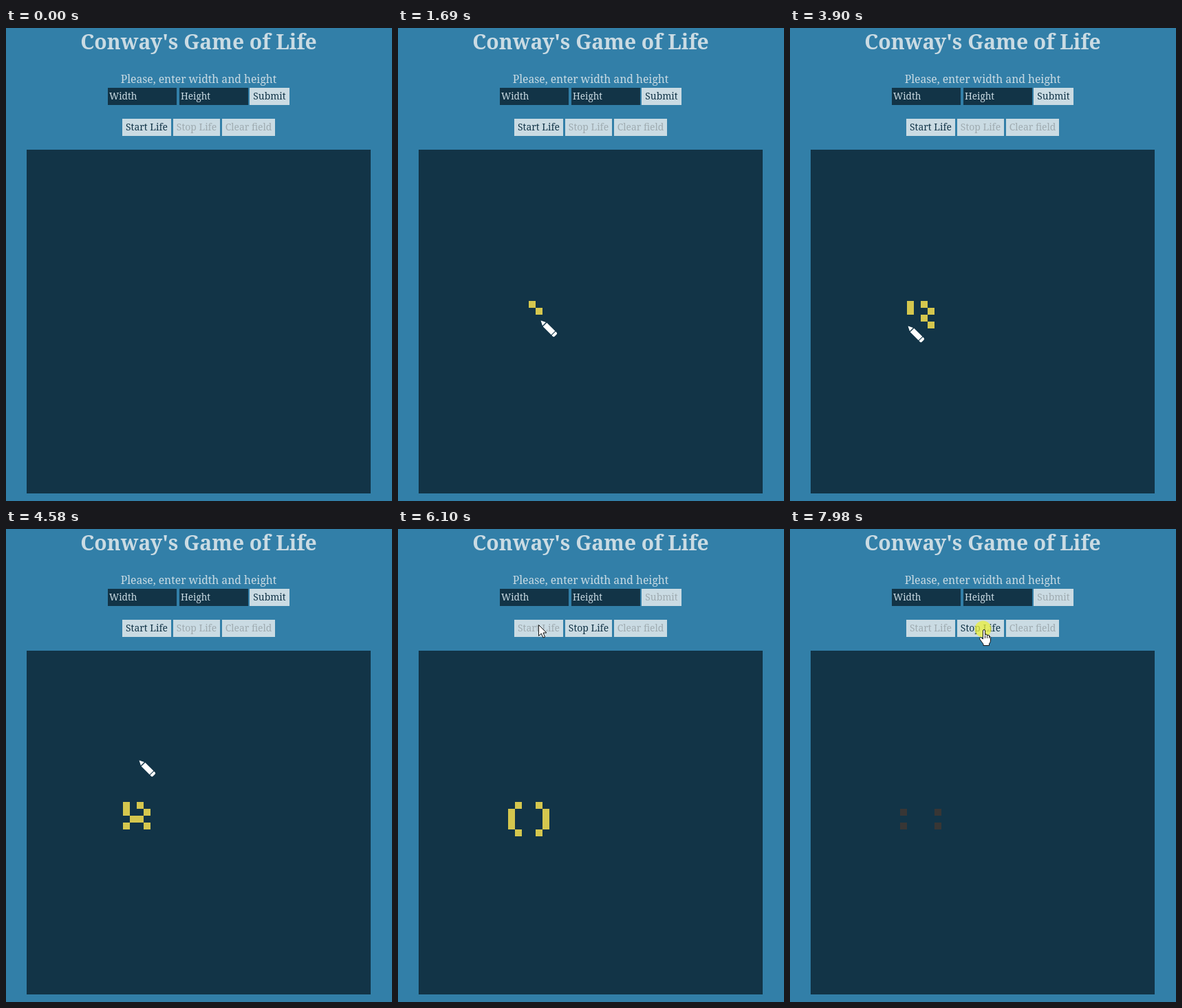
An HTML page with a canvas for the animation above (8000 ms loop, 561 by 688 pixels).

```html
<!DOCTYPE html>
<html lang="en">
<head>
<meta charset="utf-8">
<title>Game of Life</title>
<style>
html, body { margin: 0; width: 100%; height: 100%; overflow: hidden; background: #327fa8; }
canvas { display: block; }
</style>
</head>
<body>
<canvas id="stage" width="561" height="688"></canvas>
<script>
const ctx = document.getElementById('stage').getContext('2d');
const LOOP = 8000, START = 5490, TICK = 100, GLOW = 70;
const SPEED = 0.35; // pointer pixels per millisecond
const PAGE = '#327fa8', DARK = '#123447', LIGHT = '#cadbe3', MUTED = '#9fabb0';
const CELL = '#d5c74e', TRACE = '#383635';
const FIELD = { x: 30, y: 177, size: 500, cell: 10 };

const move = (time, x, y) => ({ time, x, y });
const press = (time, x, y) => ({ time, x, y, pressed: true });

// The pointer reaches each stop by its time; presses in the field toggle the cell below.
const stops = [
  move(460, 212, 509), move(720, 182, 414), press(1140, 200, 404), press(1480, 205, 410),
  move(1690, 208, 426), press(1830, 204, 428), press(2180, 191, 421), press(2400, 184, 424),
  press(2700, 173, 414), move(2940, 160, 407), press(3200, 174, 404), press(3830, 190, 421),
  press(4100, 172, 434), press(4400, 186, 422), move(5000, 212, 141), press(START, 204, 139),
  move(6100, 204, 139), move(7130, 235, 406), move(7450, 299, 260), move(7700, 308, 118),
  press(7950, 282, 146)
];

const key = (col, row) => col + ',' + row;
const inBox = (x, y, left, top, w, h) => x >= left && x < left + w && y >= top && y < top + h;
const inField = (x, y) => inBox(x, y, FIELD.x, FIELD.y, FIELD.size, FIELD.size);

function drawnCells(t) {
  const cells = new Set();
  for (const { time, x, y, pressed } of stops) {
    if (!pressed || time > t || !inField(x, y)) continue;
    const k = key(Math.floor((x - 1 - FIELD.x) / FIELD.cell), Math.floor((y - 1 - FIELD.y) / FIELD.cell));
    if (!cells.delete(k)) cells.add(k);
  }
  return cells;
}

function nextGeneration(cells) {
  const counts = new Map();
  for (const k of cells) {
    const [col, row] = k.split(',').map(Number);
    for (let dx = -1; dx <= 1; dx++) {
      for (let dy = -1; dy <= 1; dy++) {
        if (!dx && !dy) continue;
        const n = key(col + dx, row + dy);
        counts.set(n, (counts.get(n) || 0) + 1);
      }
    }
  }
  const next = new Set();
  for (const [k, n] of counts) if (n === 3 || (n === 2 && cells.has(k))) next.add(k);
  return next;
}

const generations = [drawnCells(START)];
while (generations[generations.length - 1].size) {
  generations.push(nextGeneration(generations[generations.length - 1]));
}
const last = generations.length - 1;
// Cells that stayed alive for three generations near the end leave a dim trace.
const traces = [...generations[last - 3]].filter(k => generations[last - 4].has(k) && generations[last - 5].has(k));

function pointerAt(t) {
  const i = stops.findIndex(s => s.time > t);
  if (i === 0) return null;
  if (i < 0) return stops[stops.length - 1];
  const from = stops[i - 1], to = stops[i];
  const duration = Math.min(to.time - from.time, Math.hypot(to.x - from.x, to.y - from.y) / SPEED);
  const u = duration ? Math.min(1, (t - from.time) / duration) : 1;
  return {
    x: Math.round(from.x + (to.x - from.x) * u),
    y: Math.round(from.y + (to.y - from.y) * u)
  };
}

function box(x, y, w, h, color) {
  ctx.fillStyle = color;
  ctx.fillRect(x, y, w, h);
}

function label(text, x, y, size, color, align = 'center', weight = 400) {
  ctx.font = `${weight} ${size}px "Noto Serif", serif`;
  ctx.textAlign = align;
  ctx.fillStyle = color;
  ctx.fillText(text, x, y);
}

function button(text, x, y, w, enabled) {
  box(x, y, w, 25, LIGHT);
  label(text, x + w / 2, y + 17, 13.9, enabled ? DARK : MUTED);
}

function input(text, x) {
  box(x, 87, 100, 25, DARK);
  label(text, x + 2, 104, 13.6, LIGHT, 'left', 500);
}

function drawCells(cells, color) {
  for (const k of cells) {
    const [col, row] = k.split(',').map(Number);
    box(FIELD.x + col * FIELD.cell, FIELD.y + row * FIELD.cell, FIELD.cell, FIELD.cell, color);
  }
}

function drawPencil() {
  ctx.translate(-.5, -.5);
  ctx.rotate(Math.PI / 4);
  ctx.fillStyle = '#fff';
  ctx.beginPath();
  ctx.moveTo(0, 0);
  ctx.lineTo(7, -3.5);
  ctx.lineTo(7, 3.5);
  ctx.fill();
  ctx.fillRect(8.5, -4, 17, 8);
  ctx.beginPath();
  ctx.roundRect(26.5, -4, 4, 8, [0, 2, 2, 0]);
  ctx.fill();
}

const arrowShape = new Path2D('M.5 .5V16.5L4.2 13L7 19L9.6 18L7 12H11.8Z');
const handShape = new Path2D('M-1.5 14V2Q-1.5 .5 0 .5T1.5 2V8Q1.5 7 3 7T4.5 9Q5 8 6 8.2T7.5 10' +
  'Q9.5 9.5 9.5 12V16Q9.5 19 7.5 21V23.5H-1V21.5L-6 14.5Q-7 12.5 -5.5 11.8T-3 13Z');

function drawOutlined(shape) {
  ctx.fillStyle = '#fff';
  ctx.strokeStyle = '#111';
  ctx.lineWidth = 1;
  ctx.fill(shape);
  ctx.stroke(shape);
}

function drawHand() {
  drawOutlined(handShape);
  ctx.beginPath();
  for (let x = 1.5; x < 9; x += 3) {
    ctx.moveTo(x, 8.5);
    ctx.lineTo(x, 13);
  }
  ctx.stroke();
}

function drawPointer(t, running) {
  const pointer = pointerAt(t);
  if (!pointer) return;
  const { x, y } = pointer;
  if (stops.some(s => s.pressed && t >= s.time && t < s.time + GLOW)) {
    ctx.fillStyle = 'rgba(235, 240, 60, .75)';
    ctx.beginPath();
    ctx.arc(x - 1.5, y - .5, 12, 0, Math.PI * 2);
    ctx.fill();
  }
  const onButton = running ? inBox(x, y, 243, 132, 68, 25) : inBox(x, y, 169, 132, 71, 25);
  ctx.save();
  ctx.translate(x, y);
  if (inField(x, y)) drawPencil();
  else if (onButton) drawHand();
  else drawOutlined(arrowShape);
  ctx.restore();
}

function draw(t) {
  const running = t >= START;
  box(0, 0, 561, 688, PAGE);
  label("Conway's Game of Life", 280, 31, 30, LIGHT, 'center', 700);
  label('Please, enter width and height', 280, 80, 15.7, LIGHT);
  input('Width', 148);
  input('Height', 252);
  button('Submit', 354, 87, 58, !running);
  button('Start Life', 169, 132, 71, !running);
  button('Stop Life', 243, 132, 68, running);
  button('Clear field', 314, 132, 77, false);

  box(FIELD.x, FIELD.y, FIELD.size, FIELD.size, DARK);
  if (running) {
    const generation = Math.min(last, 1 + Math.floor((t - START) / TICK));
    if (generation > last - 3) drawCells(traces, TRACE);
    drawCells(generations[generation], CELL);
  } else {
    drawCells(drawnCells(t), CELL);
  }
  drawPointer(t, running);
}

const begin = performance.now();
function frame() {
  draw((performance.now() - begin) % LOOP);
  requestAnimationFrame(frame);
}
frame();
</script>
</body>
</html>
```
